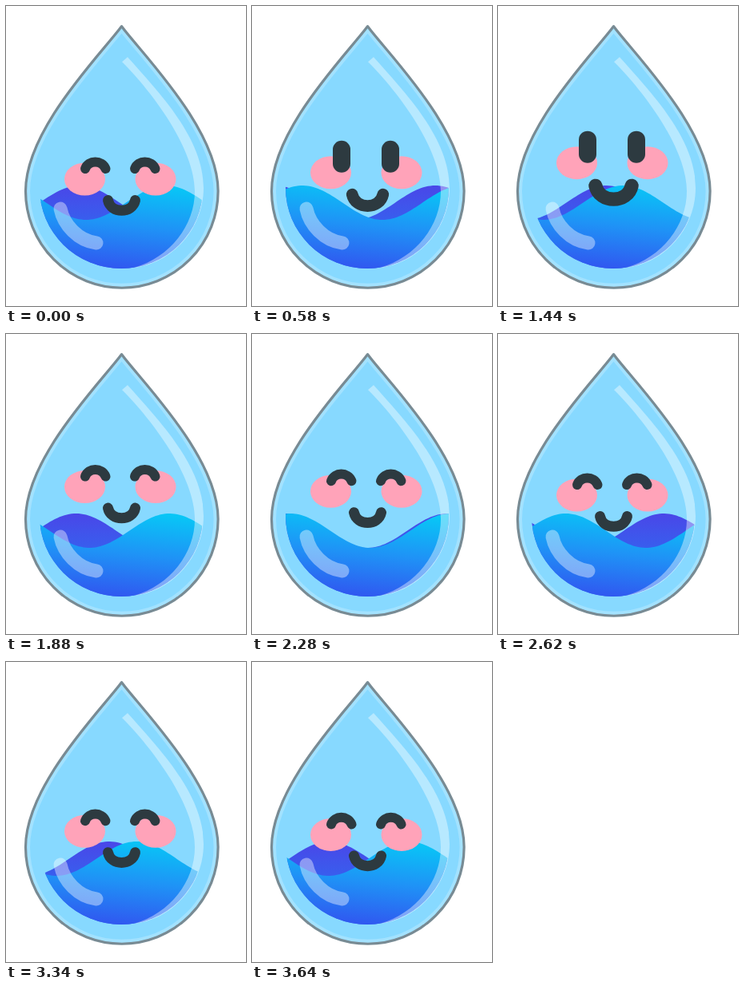
An HTML page that plays this animation: 300x376 px, repeating every 3.68 s.

```html
<!DOCTYPE html>
<html lang="en">
<head>
<meta charset="utf-8">
<title>Water drop</title>
<style>
  html, body { margin: 0; width: 100%; height: 100%; overflow: hidden; background: #fff; }
  svg { display: block; width: 300px; height: 376px; }
  .ink { fill: none; stroke: #2d3a40; stroke-width: 12; stroke-linecap: round; }
</style>
</head>
<body>
<svg viewBox="0 0 300 376">
  <defs>
    <path id="drop" d="M144.500 25.500C118 61 24.500 155 24.500 232A120.300 121.300 0 0 0 265.100 232C265.100 155 171 61 144.500 25.500Z"/>
    <clipPath id="dropClip"><use href="#drop"/></clipPath>
    <clipPath id="bowl"><ellipse cx="144" cy="228" rx="102" ry="101"/></clipPath>
    <linearGradient id="frontFill" gradientUnits="userSpaceOnUse" x1="150" y1="222" x2="140" y2="329">
      <stop offset="0" stop-color="#08c6f6"/>
      <stop offset=".5" stop-color="#1f92f6"/>
      <stop offset="1" stop-color="#3058f0"/>
    </linearGradient>
    <linearGradient id="backFill" gradientUnits="userSpaceOnUse" x1="0" y1="224" x2="0" y2="272">
      <stop offset="0" stop-color="#4a46e8"/>
      <stop offset="1" stop-color="#3760ee"/>
    </linearGradient>
  </defs>

  <use href="#drop" fill="#87d9ff"/>
  <use href="#drop" clip-path="url(#dropClip)" fill="none" stroke="#a3e2ff" stroke-width="11"/>
  <use href="#drop" fill="none" stroke="#788b94" stroke-width="3.200" stroke-linejoin="round"/>

  <g clip-path="url(#bowl)">
    <path id="back" fill="url(#backFill)"/>
    <path id="front" fill="url(#frontFill)"/>
  </g>

  <path d="M68 254C72 274 90 294 113 297" fill="none" stroke="#fff" stroke-opacity=".4" stroke-width="17" stroke-linecap="round"/>
  <path d="M152 64C192 109 247 166 247 228C247 280 207 323 160 328C205 315 236 275 236 232C236 180 185 110 145 70Z" fill="#fff" fill-opacity=".4"/>

  <g id="face">
    <g fill="#ffa3b9">
      <ellipse cx="98.5" cy="217" rx="25.5" ry="20.5"/>
      <ellipse cx="187" cy="217" rx="25.5" ry="20.5"/>
    </g>
    <g id="happy" class="ink">
      <path d="M99 204C103 192.500 120 192.500 124.500 204"/>
      <path d="M161 204C165 192.500 182 192.500 186.500 204"/>
    </g>
    <g id="open" fill="#2d3a40">
      <rect x="101" y="177" width="22" height="40" rx="11"/>
      <rect x="162" y="177" width="22" height="40" rx="11"/>
    </g>
    <path id="mouth" class="ink" style="stroke-width: 13" d="M-17 6.500C-13.500 23.500 13.500 23.500 17 6.500"/>
  </g>
</svg>
<script>
  const LOOP = 3680, HALF = LOOP / 2, WAKE = 30;
  const WAVE = 200, LEVEL = 246.5, AMP = 21.5;
  const $ = id => document.getElementById(id);
  const [back, front, face, happy, open, mouth] =
    ["back", "front", "face", "happy", "open", "mouth"].map($);

  function wave(crest) {
    let d = "M40 335";
    for (let x = 40; x <= 250; x += 3) {
      const y = LEVEL - AMP * Math.cos(2 * Math.PI * (x - crest) / WAVE);
      d += `L${x} ${y.toFixed(2)}`;
    }
    return d + "L250 335Z";
  }

  function draw(t) {
    // The two waves run in opposite directions.
    const shift = WAVE * t / HALF + 4;
    front.setAttribute("d", wave(196 + shift));
    back.setAttribute("d", wave(96 - shift));

    const rise = 1 - Math.abs(t - HALF) / HALF;
    face.setAttribute("transform", `translate(0 ${-26 * rise})`);

    // Open eyes and a widening smile on the way up, a happy squint on the way down.
    const awake = t >= WAKE && t < HALF;
    open.setAttribute("visibility", awake ? "visible" : "hidden");
    happy.setAttribute("visibility", awake ? "hidden" : "visible");
    const size = awake ? 1 + 0.42 * t / HALF : 1;
    mouth.setAttribute("transform", `translate(144.5 237) scale(${size})`);
  }

  let start;
  function tick(now) {
    start ??= now;
    draw((now - start) % LOOP);
    requestAnimationFrame(tick);
  }
  draw(0);
  requestAnimationFrame(tick);
</script>
</body>
</html>
```
